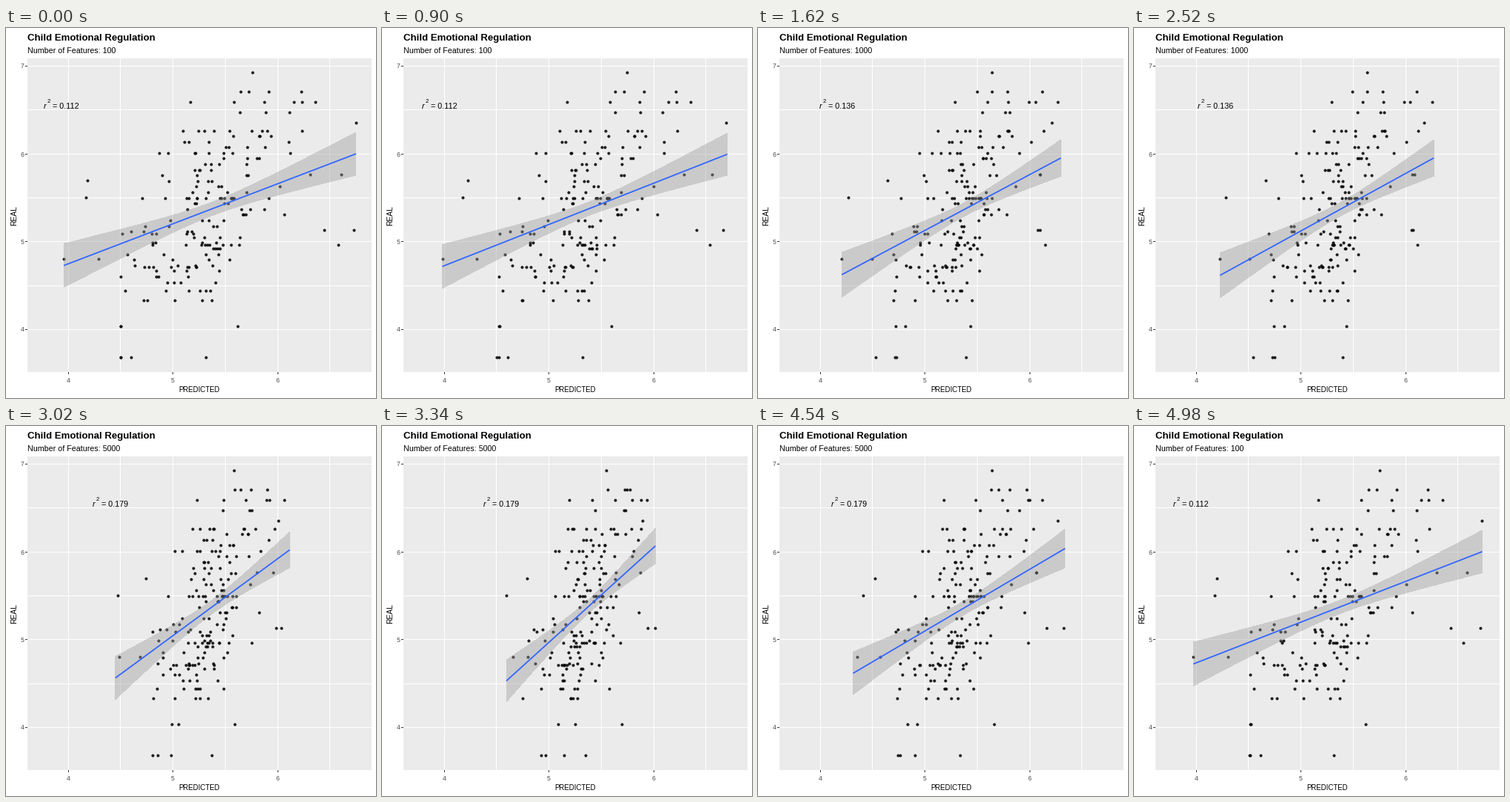
Recreate the animation shown at these times as a matplotlib script. Size 500 px wide and 500 px high, loop 5 s.

```python
import numpy as np
import matplotlib.pyplot as plt
from matplotlib.animation import FuncAnimation
from matplotlib.patches import Polygon, Rectangle

SIZE, FRAMES, STEP = 500, 250, 20
PX = 0.72  # points per pixel at 100 dpi
SANS = "Liberation Sans"

# One entry per state: feature count, r squared, label x
STATES = [(100, "0.112", 50.5), (1000, "0.136", 84.5), (5000, "0.179", 136.5)]
# Ends of the regression line and how fast its band opens
FITS = [(78, 321, 473, 170, 0.1405),
        (115, 334, 406, 176, 0.1775),
        (168, 344.5, 369.5, 162, 0.241)]
CENTRE, NARROW = 278, 9

# Key points on the fringe of the cloud: y, then x in each state
FRINGE = [
    (60, 333, 315, 303), (86, 399, 383, 335), (100, 418, 404, 358),
    (128, 473, 393, 352), (198, 411, 380, 349), (198, 453, 377, 316),
    (206, 110, 178, 196), (229, 108, 123, 168), (273, 430, 375, 359),
    (273, 470, 377, 369), (293, 449, 385, 300), (312, 78, 115, 177),
    (312, 125, 155, 197),
]
# Scores that occur most often: y and number of points
COMMON = {86: 3, 100: 5, 114: 3, 139: 9, 169: 4, 230: 12, 278: 5, 293: 9,
          323: 8, 355: 6, 368: 5, 403: 3, 445: 4}


def make_points():
    """Return y and the x positions in the three states."""
    rng = np.random.default_rng(12)
    rows = np.repeat(np.arange(146, 346, 7.6).round(), 4)
    y = np.r_[rows, np.repeat(list(COMMON), list(COMMON.values()))]
    noise = rng.normal(0, 1, (3, len(y)))
    first = np.clip(310 - 0.37 * (y - 139) + 48 * noise[0], 155, 400)
    mid = np.clip(CENTRE + 0.75 * (first - CENTRE) + 10 * noise[1], 150, 395)
    last = np.clip(CENTRE + 0.53 * (first - CENTRE) + 17 * noise[2], 190, 350)
    data = np.vstack([FRINGE, np.column_stack([y, first, mid, last])])
    return data[:, 0], data[:, 1:].T


def make_fit(x0, y0, x1, y1, spread):
    """Return rows x, line, upper edge and lower edge."""
    x = np.linspace(x0, x1, 80)
    y = np.linspace(y0, y1, 80)
    half = np.hypot(NARROW, spread * (x - CENTRE))
    return np.array([x, y, y - half, y + half])


def phase(i):
    """Return the state left, the state approached and the progress."""
    state, r = divmod(i, 84)
    steps = 41 if state == 2 else 42
    return state, (state + 1) % 3, max(0, r - 41) / steps


fig = plt.figure(figsize=(SIZE / 100, SIZE / 100), dpi=100, facecolor="white")
ax = fig.add_axes([0, 0, 1, 1])
ax.set_xlim(0, SIZE)
ax.set_ylim(SIZE, 0)
ax.axis("off")


def text(x, y, s, size, **kw):
    kw = {"family": SANS, "va": "baseline", "zorder": 6, **kw}
    return ax.text(x, y, s, fontsize=size * PX, **kw)


def rule(xs, ys, color):
    ax.plot(xs, ys, color=color, lw=PX, antialiased=False, snap=False,
            solid_capstyle="butt", zorder=1)


ax.add_patch(Rectangle((29, 41), 465, 424, fc="#EBEBEB", lw=0,
                       antialiased=False, zorder=0))
# Gridlines stand half a unit apart; every other one has a tick and a number
for k in range(6):
    x = int(84 + 70.75 * k) + 0.5
    rule([x, x], [41, 465], "white")
    if k in (0, 2, 4):
        rule([x, x], [465, 468], "#333333")
        text(x - 0.5, 479, str(4 + k // 2), 8.8, color="#4D4D4D", ha="center")
for k in range(7):
    y = round(51 + 59.35 * k) + 0.5
    rule([29, 494], [y, y], "white")
    if k % 2 == 0:
        rule([26, 29], [y, y], "#333333")
        text(24.5, y + 3, str(7 - k // 2), 8.8, color="#4D4D4D", ha="right")

text(29, 17, "Child Emotional Regulation", 13.3, weight="bold")
subtitle = text(29, 34, "", 10.65)
text(261, 492.5, "PREDICTED", 9.6, ha="center")
text(16.5, 253.5, "REAL", 10.3, rotation=90, ha="right", va="center")

point_y, point_x = make_points()
fits = [make_fit(*f) for f in FITS]

dots = ax.scatter(point_x[0], point_y, s=(2.9 * PX) ** 2, lw=1.1 * PX,
                  fc=(0, 0, 0, 0.75), ec=(0, 0, 0, 0.9), zorder=2)
band = ax.add_patch(Polygon(np.zeros((4, 2)), fc="#999999", alpha=0.4, lw=0,
                            antialiased=False, zorder=3))
line, = ax.plot([], [], color="#3366FF", lw=1.8 * PX,
                solid_capstyle="butt", zorder=4)
label = [(text(0, 109, "r", 10.8, style="italic"), 0),
         (text(0, 101, "2", 7.8), 5),
         (text(0, 109, "", 10.8), 12.5)]


def update(i):
    a, b, p = phase(i)

    def mix(u, v):
        return u + (v - u) * p

    dots.set_offsets(np.column_stack([mix(point_x[a], point_x[b]).round(),
                                      point_y]))
    x, y, top, low = mix(fits[a], fits[b])
    line.set_data(x, y)
    band.set_xy(np.column_stack([np.r_[x, x[::-1]], np.r_[top, low[::-1]]]))

    count, r2, _ = STATES[b if p >= 0.5 else a]
    subtitle.set_text(f"Number of Features: {count}")
    label[2][0].set_text(f"= {r2}")
    left = mix(STATES[a][2], STATES[b][2])
    for part, dx in label:
        part.set_x(left + dx)
    return [dots, band, line, subtitle] + [part for part, _ in label]


anim = FuncAnimation(fig, update, frames=FRAMES, interval=STEP,
                     init_func=lambda: update(0), repeat=True, repeat_delay=0)
plt.show()
```
